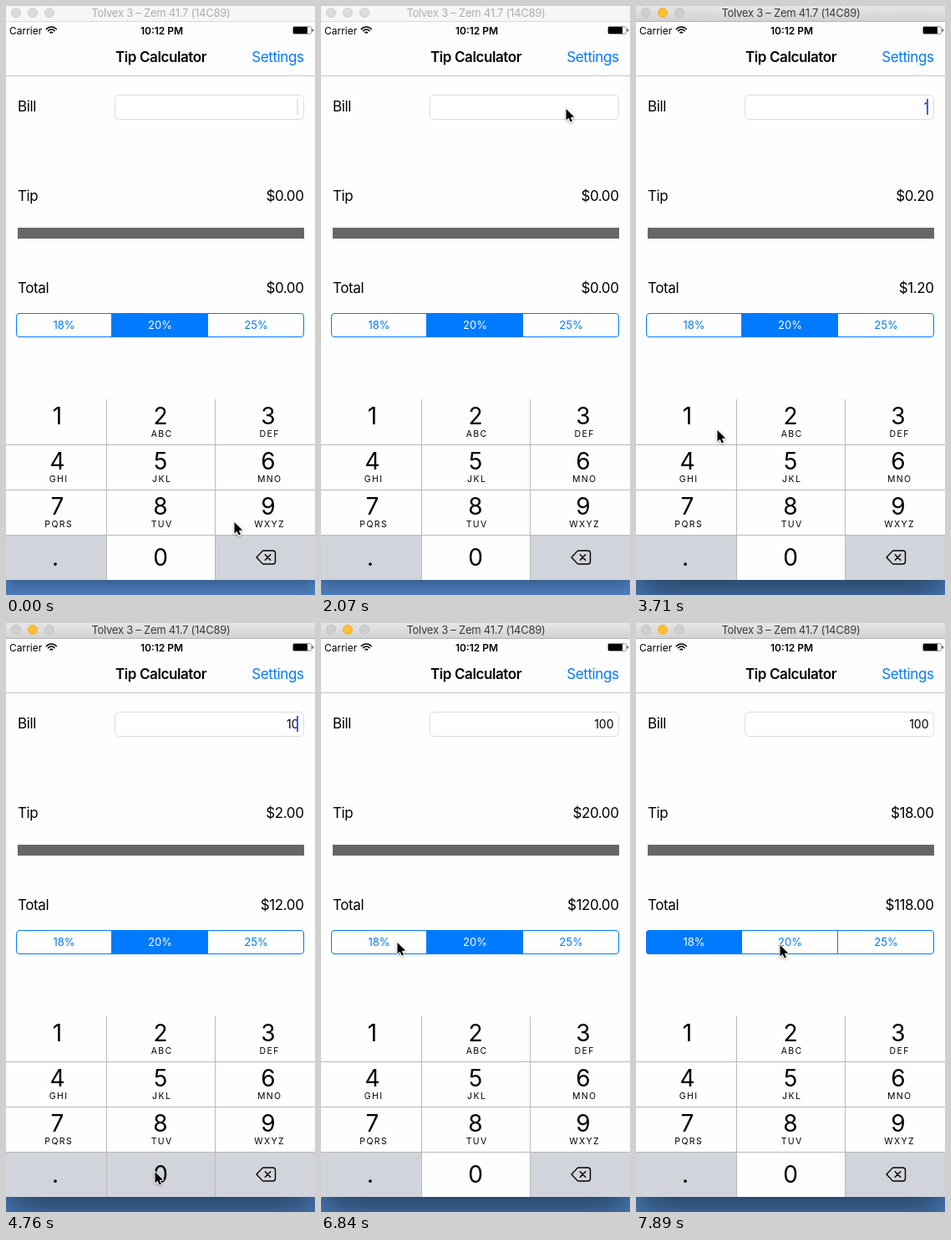
Animation of 370 by 704 pixels, one loop 8000 ms. Source, as an HTML page with a canvas:

```html
<!DOCTYPE html>
<html lang="en">
<head>
<meta charset="utf-8">
<title>Tip Calculator</title>
<style>
  html, body { margin: 0; width: 100%; height: 100%; overflow: hidden; background: #4a7dbb; }
  canvas { display: block; }
</style>
</head>
<body>
<canvas id="stage" width="370" height="704"></canvas>
<script>
const ctx = document.getElementById('stage').getContext('2d');
const LOOP = 8000;
const STEP = 148.8; // the screen refreshes in steps
const LEAD = 20;
const FONT = 'Inter, "Liberation Sans", sans-serif';
const BLUE = '#007aff';
const KEY_GRAY = '#d1d4db';
const LINE = '#b9b9bb';

const FOCUS_AT = 3410;
const SELECT_AT = 6980;
const TYPING = [[3560, '1'], [4760, '10'], [4910, '100']];

// Pointer moves: start, end, x, y
const HOME = [273, 616];
const MOVES = [
  [0, 450, 208, 390], [450, 600, 258, 304], [750, 1340, 344, 91], [1340, 1630, 293, 122],
  [2220, 3260, 87, 488], [3530, 4460, 178, 655], [5350, 6400, 109, 419],
  [6400, 6840, 91, 381], [7440, 7890, 172, 384]
];

const clamp = v => Math.min(1, Math.max(0, v));
const smooth = k => k * k * (3 - 2 * k);

function pointerAt(t) {
  let [x, y] = HOME;
  for (const [from, to, nx, ny] of MOVES) {
    const k = smooth(clamp((t - from) / (to - from)));
    x += (nx - x) * k;
    y += (ny - y) * k;
  }
  return [Math.round(x), Math.round(y)];
}

// The caret stays lit after a keystroke, then blinks once a second
function caretAlpha(t, typedAt) {
  if (typedAt && t - typedAt < 580) return 1;
  const p = (typedAt ? t - typedAt + 330 : t) / 1000;
  return clamp(0.5 + 1.6 * Math.cos(2 * Math.PI * (p - 0.715)));
}

function rect(x, y, w, h, color) {
  ctx.fillStyle = color;
  ctx.fillRect(x, y, w, h);
}

function box(x, y, w, h, r) {
  ctx.beginPath();
  ctx.roundRect(x, y, w, h, r);
}

function stroke(color, width = 1) {
  ctx.strokeStyle = color;
  ctx.lineWidth = width;
  ctx.stroke();
}

function text(s, x, y, { size = 17, weight = 400, align = 'left', color = '#000', track = 0 } = {}) {
  ctx.font = `${weight} ${size}px ${FONT}`;
  ctx.letterSpacing = track + 'px';
  ctx.textAlign = align;
  ctx.fillStyle = color;
  ctx.fillText(s, x, y);
}

const label = (s, x, y, opts) => text(s, x, y, { track: -0.41, ...opts });

function drawDesktop(active) {
  rect(0, 680, 370, 24, '#4c80bf');
  ctx.save();
  ctx.shadowColor = active ? 'rgba(0,0,0,.5)' : 'rgba(0,0,0,.32)';
  ctx.shadowBlur = active ? 40 : 20;
  ctx.shadowOffsetY = active ? 18 : 6;
  rect(0, 0, 370, 686, '#fefefe');
  ctx.restore();
}

function drawTitleBar(active) {
  const g = ctx.createLinearGradient(0, 0, 0, 18);
  g.addColorStop(0, active ? '#e6e6e6' : '#f6f6f6');
  g.addColorStop(1, active ? '#d2d2d2' : '#f6f6f6');
  rect(0, 0, 370, 18, g);
  rect(0, 18, 370, 1, active ? '#b4b4b4' : '#d8d8d8');
  for (let i = 0; i < 3; i++) {
    const lit = active && i === 1;
    ctx.beginPath();
    ctx.arc(12 + 20 * i, 8, 5.5, 0, 7);
    ctx.fillStyle = lit ? '#fdbe35' : active ? '#cfcfcf' : '#dcdcdc';
    ctx.fill();
    stroke(lit ? '#f0b030' : active ? '#c2c2c2' : '#cfcfcf');
  }
  text('Tolvex 3 – Zem 41.7 (14C89)', 185.5, 13,
    { size: 13, align: 'center', track: -0.25, color: active ? '#3a3a3a' : '#aeaeae' });
}

function drawStatusBar() {
  rect(0, 19, 370, 64, '#fdfdfd');
  rect(0, 83, 370, 1, '#c6c6c8');
  text('Carrier', 4, 34, { size: 12 });
  text('10:12 PM', 186.5, 34, { size: 12, weight: 600, align: 'center' });
  for (const r of [8, 5, 1.7]) {
    ctx.beginPath();
    ctx.arc(54.3, 33, r, -Math.PI * 0.77, -Math.PI * 0.23);
    stroke('#000', 1.6);
  }
  box(343.5, 24.5, 22, 9, 2);
  stroke('#999');
  rect(344, 25, 17, 8, '#000');
  rect(366.5, 27.5, 1.5, 3, '#444');
  label('Tip Calculator', 185.5, 67, { weight: 600, align: 'center' });
  label('Settings', 356.5, 67, { align: 'right', color: BLUE });
}

function drawForm(bill, rate, caret) {
  const row = (name, y, value) => {
    label(name, 14, y);
    if (value !== undefined) label('$' + value.toFixed(2), 356.5, y, { align: 'right' });
  };
  row('Bill', 126);
  row('Tip', 233, bill * rate);
  row('Total', 343, bill * (1 + rate));
  rect(14, 265, 343, 13, '#666');
  box(130.5, 106.5, 226, 29, 5);
  ctx.fillStyle = '#fff';
  ctx.fill();
  stroke('#dcdcdc');
  text(bill, 350.5, 126, { size: 14, align: 'right' });
  ctx.globalAlpha = caret;
  rect(348, 111, 2, 19, '#3a62f0');
  ctx.globalAlpha = 1;
}

function drawSegments(rate) {
  ctx.save();
  box(12, 367, 345, 29, 4);
  ctx.clip();
  [18, 20, 25].forEach((pct, i) => {
    const x = 12 + 115 * i;
    const on = pct === Math.round(rate * 100);
    rect(x - 1, 367, on ? 116 : 1, 29, BLUE);
    text(pct + '%', x + 57.5, 386, { size: 13, align: 'center', color: on ? '#fff' : BLUE });
  });
  ctx.restore();
  box(12.5, 367.5, 344, 28, 3.5);
  stroke(BLUE);
}

function drawKeypad(pressed) {
  const cols = [[0, 120, 61.5], [121, 129, 185], [251, 119, 314]];
  const keys = ['1', '2 ABC', '3 DEF', '4 GHI', '5 JKL', '6 MNO', '7 PQRS', '8 TUV', '9 WXYZ', '.', '0', ''];
  rect(0, 470, 370, 216, '#fefefe');
  keys.forEach((key, i) => {
    const [digit, letters] = key.split(' ');
    const [x, w, cx] = cols[i % 3];
    const row = Math.floor(i / 3);
    const top = 470 + row * 54;
    if (digit === pressed || digit === '.' || !digit) rect(x, top, w, 54, KEY_GRAY);
    text(digit, digit === '.' ? 59 : cx, row === 3 ? 669 : top + 30, { size: 28, align: 'center' });
    if (letters) text(letters, cx + 1.7, top + 45, { size: 10.5, align: 'center', track: 1.4 });
  });
  for (const x of [120, 250]) rect(x, 470, 1, 216, LINE);
  for (const y of [524, 578, 632]) rect(0, y, 370, 1, LINE);
  drawDelete();
}

function drawDelete() {
  ctx.lineJoin = ctx.lineCap = 'round';
  ctx.beginPath();
  ctx.moveTo(300, 659);
  ctx.arcTo(307.5, 651, 315, 651, 2);
  ctx.arcTo(322.5, 651, 322.5, 659, 3);
  ctx.arcTo(322.5, 667, 315, 667, 3);
  ctx.arcTo(307.5, 667, 300, 659, 2);
  ctx.closePath();
  stroke('#000', 1.4);
  ctx.beginPath();
  for (const d of [-3.2, 3.2]) {
    ctx.moveTo(313.5 - d, 655.8);
    ctx.lineTo(313.5 + d, 662.2);
  }
  stroke('#000', 1.5);
}

function drawPointer([x, y]) {
  ctx.save();
  ctx.translate(x + 0.5, y + 1);
  ctx.lineJoin = 'round';
  const arrow = new Path2D('M0 0V13.5L3.1 10.7L5.2 15.6L7.4 14.6L5.3 9.9L9.6 9.6Z');
  ctx.shadowColor = 'rgba(0,0,0,.35)';
  ctx.shadowBlur = 3;
  ctx.shadowOffsetY = 1;
  ctx.strokeStyle = '#fff';
  ctx.lineWidth = 2;
  ctx.stroke(arrow);
  ctx.shadowColor = 'transparent';
  ctx.fillStyle = '#000';
  ctx.fill(arrow);
  ctx.restore();
}

// A key stays gray while held and shortly after
function pressedKey(t) {
  if (t >= FOCUS_AT && t < FOCUS_AT + 300) return '1';
  if (t >= 4610 && t < 4910) return '0';
}

function draw(time) {
  const t = Math.floor((time + LEAD) / STEP) * STEP;
  const [typedAt, bill] = TYPING.filter(e => e[0] <= t).pop() || [0, ''];
  const active = t >= FOCUS_AT;
  const rate = t >= SELECT_AT ? 0.18 : 0.2;
  drawDesktop(active);
  drawTitleBar(active);
  drawStatusBar();
  drawForm(bill, rate, caretAlpha(t, typedAt));
  drawSegments(rate);
  drawKeypad(pressedKey(t));
  drawPointer(pointerAt(t));
}

const start = performance.now();
function tick() {
  draw((performance.now() - start) % LOOP);
  requestAnimationFrame(tick);
}
tick();
</script>
</body>
</html>
```
